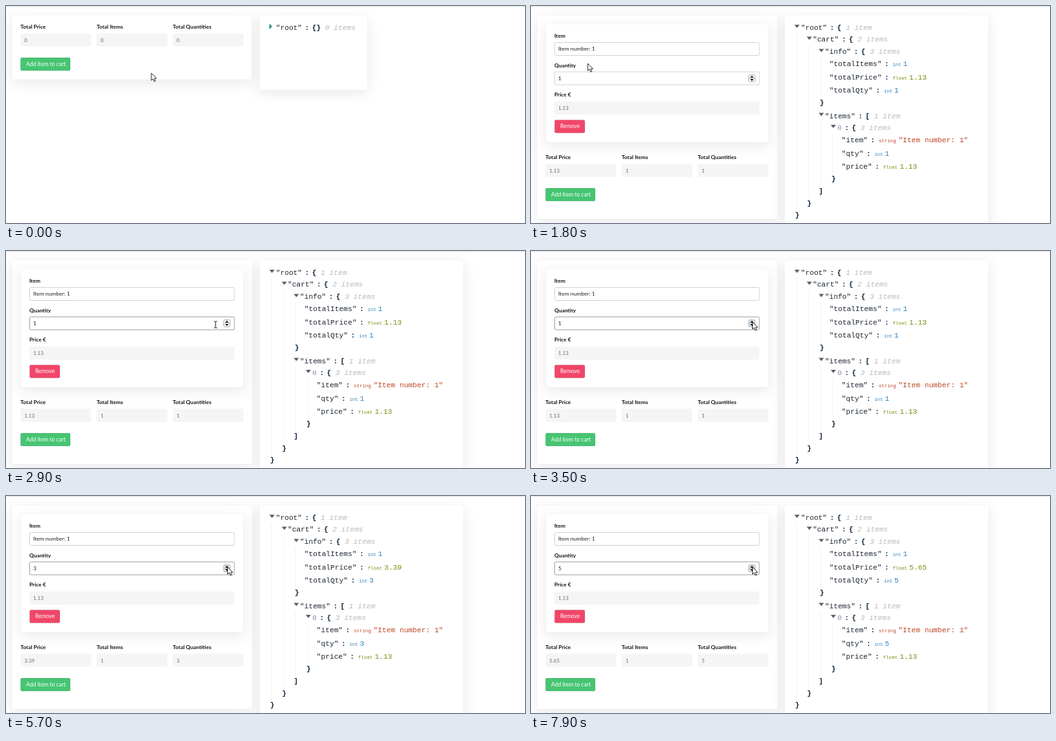
Write an HTML page that moves like this. It is 800 by 336 pixels and loops after 8 s.

```html
<!DOCTYPE html>
<html lang="en">
<head>
<meta charset="utf-8">
<title>Cart form</title>
<style>
html, body { margin: 0; width: 100%; height: 100%; overflow: hidden; background: #fff; }
svg { display: block; width: 100%; height: 100%; }
text { font: 8.45px Lato, "Open Sans", sans-serif; fill: #1c1c1c; white-space: pre; }
.label { font-weight: 700; font-size: 8.4px; fill: #111; }
.muted { fill: #6a6a6a; font-size: 8px; }
.button { fill: #fff; font-size: 8.6px; }
.card { fill: #fff; stroke: rgba(10,10,10,.025); filter: drop-shadow(0 5px 10px rgba(10,10,10,.09)); }
.json { font: 11.2px "Liberation Mono", "Courier New", monospace; fill: #1b2530; }
.brace { font-weight: bold; fill: #06223a; }
.count { font-style: italic; fill: #b8b8b8; }
.index { fill: #8b8fb4; }
.int { fill: #2a80be; }
.float { fill: #7c8d12; }
.string { fill: #bd4420; }
.type { font-size: 7.4px; }
</style>
</head>
<body>
<svg id="stage" viewBox="0 0 800 336"></svg>
<script>
const LOOP = 8000, ADDED = 1500, PRICE = 1.13;
const CHAR = 6.72, TYPE_CHAR = 4.75;
const stage = document.getElementById("stage");

const text = (x, y, s, cls = "") => `<text x="${x}" y="${y}" class="${cls}">${s}</text>`;
const rect = (x, y, w, h, fill, extra = "") =>
  `<rect x="${x}" y="${y}" width="${w}" height="${h}" rx="2" fill="${fill}" ${extra}/>`;
const card = (x, y, w, h) => rect(x, y, w, h, "#fff", 'class="card"');
const path = (d, fill, extra = "") => `<path d="${d}" fill="${fill}" ${extra}/>`;

const readonly = (x, y, w, value) =>
  rect(x, y, w, 20.5, "#f5f5f5") + text(x + 6, y + 13.3, value, "muted");
const input = (y, value, border = "#d2d2d2") =>
  rect(36.5, y + .5, 315.5, 20, "#fff", `stroke="${border}"`) + text(42, y + 13.4, value);
const button = (x, y, w, fill, label) =>
  rect(x + .5, y + .5, w - 1, 20, fill, 'stroke="rgba(0,0,0,.1)"') + text(x + 9, y + 13.2, label, "button");

function totals(y, qty, buttonFill) {
  const values = [qty ? (PRICE * qty).toFixed(2) : 0, qty ? 1 : 0, qty];
  return ["Total Price", "Total Items", "Total Quantities"].map((label, i) => {
    const x = 22.3 + i * 117.4;
    return text(x, y + 34.8, label, "label") + readonly(x, y + 42.3, 109, values[i]);
  }).join("") + button(22, y + 79.5, 77.5, buttonFill, "Add item to cart");
}

function spinner(hovered) {
  return rect(335.5, 106.5, 10, 11, hovered ? "#d3e0ec" : "#f2f2f2", 'stroke="#b5b5b5"') +
    path("M337.8 111l2.7-3.2 2.7 3.2zM337.8 113l2.7 3.2 2.7-3.2zM335.5 112h10", "#222") +
    path("M335.5 112h10", "none", 'stroke="#b5b5b5" stroke-width=".7"');
}

function itemCard(qty, focused, hoverSpinner) {
  return card(23, 28, 343, 183) +
    text(36, 48.8, "Item", "label") + input(56, "Item number: 1") +
    text(36, 94.8, "Quantity", "label") + input(101.5, qty, focused ? "#9c9c9c" : "#d2d2d2") +
    spinner(hoverSpinner) +
    text(36, 140, "Price €", "label") + readonly(36, 147.7, 316, PRICE) +
    button(36, 176, 47.5, "#f14668", "Remove");
}

const triangle = (x, y) => path(`M${x} ${y - 8}h8l-4 5z`, "#586068");

// "key" : { n items
function branch(x, y, key, brace, count, cls = "") {
  const end = x + key.length * CHAR;
  return text(x, y, key, "json " + cls) + text(end + 4.5, y, ":", "json brace") +
    text(end + 15.5, y, brace, "json brace") +
    text(end + 15.5 + brace.length * CHAR + 6.6, y, count, "json count");
}

// "key" : type value
function leaf(x, y, key, type, value) {
  const end = x + key.length * CHAR, typeX = end + 17;
  return text(x, y, key, "json") + text(end + 4.5, y, ":", "json brace") +
    text(typeX, y, type, "json type " + type) +
    text(typeX + type.length * TYPE_CHAR + 1.8, y, value, "json " + type);
}

function tree(qty) {
  const guides = [[409.5, 42, 315], [428, 61, 297], [446.5, 80, 141], [446.5, 180, 278], [465, 198, 260]];
  const closers = [[445, 153, "}"], [463, 271, "}"], [443.5, 290, "]"], [425.5, 309, "}"], [407, 327, "}"]];
  return guides.map(([x, top, bottom]) => path(`M${x} ${top}V${bottom}`, "none", 'stroke="#f1f1f1"')).join("") +
    [[406, 37], [425, 55.5], [443.5, 74.5], [443.5, 173.5], [462, 192]].map(p => triangle(...p)).join("") +
    branch(416, 37, '"root"', "{", "1 item") +
    branch(434.2, 55.3, '"cart"', "{", "2 items") +
    branch(453, 74.3, '"info"', "{", "3 items") +
    leaf(459.8, 92.8, '"totalItems"', "int", 1) +
    leaf(459.8, 113.5, '"totalPrice"', "float", (PRICE * qty).toFixed(2)) +
    leaf(459.8, 134, '"totalQty"', "int", qty) +
    branch(453, 173.7, '"items"', "[", "1 item") +
    branch(472.2, 192, "0", "{", "3 items", "index") +
    leaf(478.8, 211, '"item"', "string", '"Item number: 1"') +
    leaf(478.8, 231.7, '"qty"', "int", qty) +
    leaf(478.8, 252.2, '"price"', "float", PRICE) +
    closers.map(([x, y, s]) => text(x, y, s, "json brace")).join("");
}

const cursors = {
  arrow: path("M0 0V11.2L2.6 8.8 4.4 13 6.3 12.2 4.6 8.2H8Z", "#fff", 'stroke="#111" stroke-width=".9"'),
  hand: path("M-1.5 1Q0 -1 1.3 1V5.2Q2.6 4.2 3.5 5.6 5 4.8 5.8 6.2 7.7 5.5 8 7.6V11.5L6.6 15.5H-.2L-4 10.4Q-4.6 8.2-1.5 9.6Z",
    "#fff", 'stroke="#111" stroke-width=".9"') +
    path("M1.3 5.2V8.4M3.5 5.6V8.5M5.8 6.2V8.7", "none", 'stroke="#111" stroke-width=".6"'),
  beam: path("M-2.5-5H-.6L0-4.4.6-5H2.5M0-4.4V4.4M-2.5 5H-.6L0 4.4.6 5H2.5", "none", 'stroke="#111"')
};

const stops = [[100, 224, 104], [900, 88, 89.5], [2100, 87.5, 89], [2750, 323, 114], [3000, 323, 114], [3450, 341.5, 110]];
function pointer(t) {
  const next = stops.findIndex(s => s[0] > t);
  if (next === 0) return stops[0].slice(1);
  if (next < 0) return stops[stops.length - 1].slice(1);
  const [t0, x0, y0] = stops[next - 1], [t1, x1, y1] = stops[next];
  const p = (t - t0) / (t1 - t0), e = p * p * (3 - 2 * p);
  return [x0 + (x1 - x0) * e, y0 + (y1 - y0) * e];
}

function scene(t) {
  const qty = [ADDED, 3900, 5400, 6300, 7900].filter(start => t >= start).length;
  const [x, y] = pointer(t);
  const overButton = !qty && x > 22 && x < 99.5 && y > 80 && y < 101;
  const overSpinner = qty && x > 334;
  const overField = qty && !overSpinner && y > 102 && y < 123;
  const green = !overButton ? "#46c572" : t < 1200 ? "#3ec46d" : "#3abb67";
  const shape = overButton ? "hand" : overField ? "beam" : "arrow";
  const page = qty
    ? card(9, 14, 371, 316) + card(391, 14, 314, 330) +
      itemCard(qty, t >= 2800, overSpinner) + totals(202, qty, green) + tree(qty)
    : card(9, 14, 370, 100) + card(391, 14, 166, 116) + totals(0, 0, green) +
      path("M406 27.5v8.5l4.2-4.2z", "#16917f") + branch(416, 37, '"root"', "{}", "0 items");
  return rect(0, 0, 800, 1, "#dedede") + page +
    `<g transform="translate(${x.toFixed(2)} ${y.toFixed(2)})">${cursors[shape]}</g>`;
}

let shown = "";
function draw() {
  const markup = scene(performance.now() % LOOP);
  if (markup !== shown) stage.innerHTML = shown = markup;
  requestAnimationFrame(draw);
}
draw();
</script>
</body>
</html>
```
